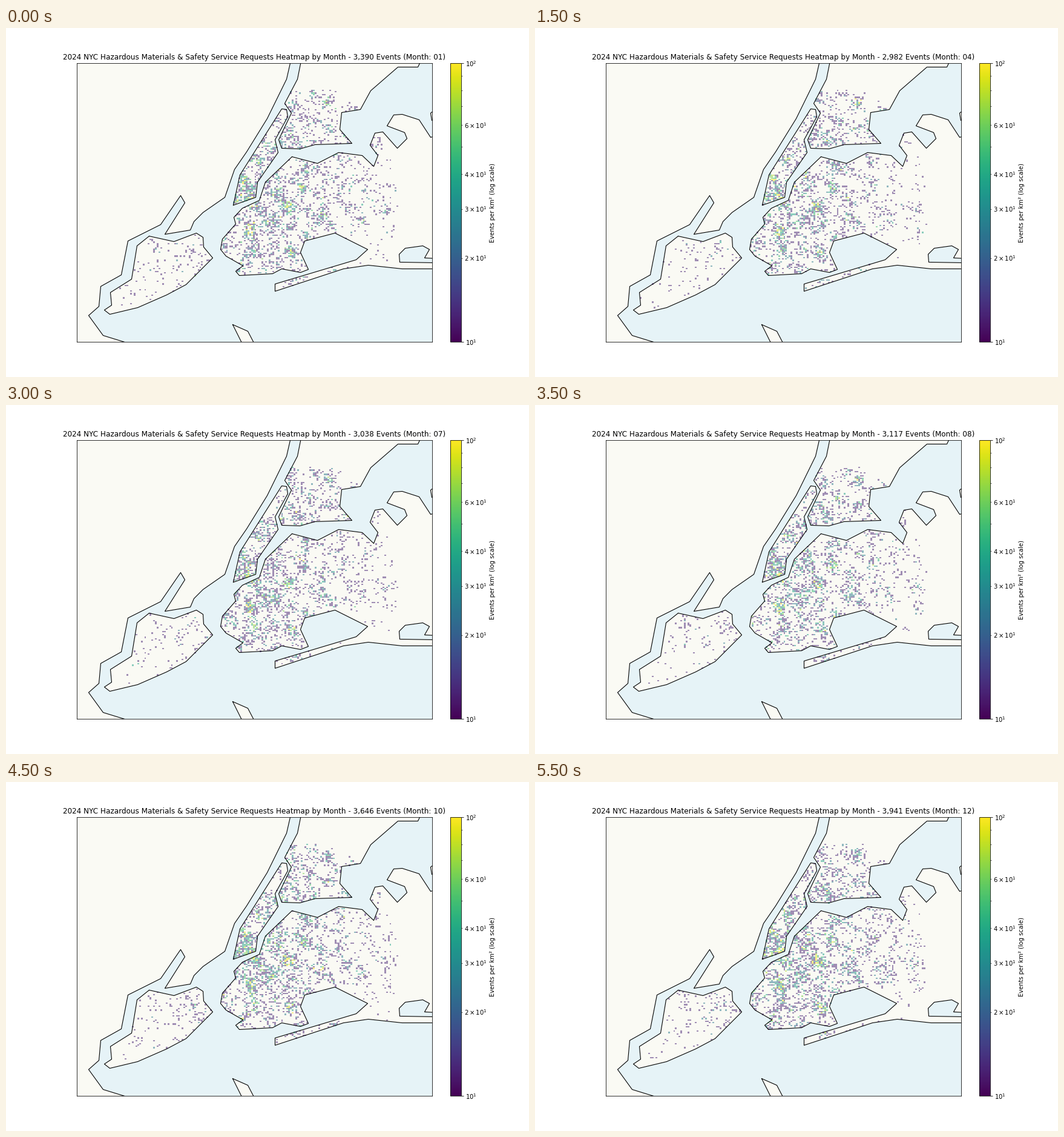
A matplotlib script for the animation above (6 s loop, 864 px wide and 576 px high).

```python
import numpy as np
import matplotlib.pyplot as plt
from matplotlib.animation import FuncAnimation
from matplotlib.cm import ScalarMappable
from matplotlib.colors import LogNorm
from matplotlib.path import Path

W, H, DPI = 864, 576, 72
LEFT, RIGHT, TOP, BOTTOM = 117, 704, 58, 518
BINS = 200
PER_KM2 = 12.6  # density of a cell holding one event
LAND, WATER = "#fafaf4", "#e6f3f7"
EVENTS = [3390, 2871, 3018, 2982, 3104, 3062, 3038, 3117, 3154, 3646, 10911, 3941]
SURGE_MONTH = 10

# Corner points of the coast, in stage pixels with y pointing down
WEST_SHORE = [
    (472, 50), (464, 85), (432, 150), (398, 205), (378, 234), (362, 280), (326, 305),
    (311, 320), (305, 334), (263, 341), (296, 289), (289, 277), (256, 325), (202, 352),
    (191, 408), (157, 427), (154, 460), (137, 475), (161, 508), (200, 520), (100, 530),
    (100, 50)]
STATEN = [
    (237, 344), (278, 353), (315, 339), (326, 346), (327, 362), (342, 380), (298, 424),
    (266, 441), (218, 462), (172, 473), (163, 466), (175, 458), (173, 437), (208, 415),
    (217, 360)]
MANHATTAN = [
    (376, 293), (413, 280), (416, 255), (450, 206), (445, 185), (466, 147), (464, 135),
    (456, 134), (387, 243)]
BRONX = [
    (489, 50), (482, 85), (461, 125), (472, 141), (451, 185), (456, 199), (486, 200),
    (511, 193), (572, 191), (552, 168), (555, 140), (586, 135), (603, 104), (648, 65),
    (681, 65), (688, 50)]
LONG_ISLAND = [
    (473, 213), (515, 224), (550, 206), (589, 211), (608, 229), (615, 211), (602, 194),
    (610, 174), (623, 172), (647, 199), (663, 183), (659, 173), (630, 162), (641, 144),
    (655, 143), (683, 152), (702, 181), (712, 178), (712, 398), (655, 398), (599, 392),
    (558, 398), (445, 435), (445, 423), (579, 383), (598, 366), (544, 339), (494, 352),
    (487, 371), (500, 399), (487, 404), (456, 398), (441, 406), (386, 409), (380, 402),
    (392, 393), (364, 377), (355, 366), (358, 349), (380, 324), (377, 313), (391, 298),
    (419, 285), (429, 255)]
SOUTH_SPIT = [(375, 490), (400, 501), (412, 524), (392, 524)]
EAST_POINT = [(712, 133), (702, 141), (704, 153), (712, 156)]
LAGOON = [(712, 381), (692, 380), (700, 366), (689, 360), (660, 364), (650, 374),
          (651, 387), (712, 388)]

# outline, usual weight, weight in the surge month
BOROUGHS = [(MANHATTAN, 1.8, 3.0), (BRONX, 2.0, 2.4), (LONG_ISLAND, 1.0, 4.0),
            (STATEN, 0.5, 2.2)]
CORE = 415, 298  # busiest point of the city
FADE, CITY_RADIUS, CITY_TOP = 85, 235, 102

# Outlines are given at pixel centres, half a pixel in from the axes box
x_edges = np.linspace(LEFT, RIGHT, BINS + 1) + 0.5
y_edges = np.linspace(TOP, BOTTOM, BINS + 1) + 0.5
gx, gy = np.meshgrid((x_edges[1:] + x_edges[:-1]) / 2, (y_edges[1:] + y_edges[:-1]) / 2)


def inside(outline):
    cells = np.column_stack([gx.ravel(), gy.ravel()])
    return Path(outline).contains_points(cells).reshape(gx.shape)


def neighbourhoods(waves=14, contrast=0.3):
    """Smooth patches of busy and quiet streets."""
    rng = np.random.default_rng(8)
    field = np.zeros_like(gx)
    for _ in range(waves):
        angle, phase = rng.uniform(0, 2 * np.pi, 2)
        turn = 2 * np.pi / rng.uniform(22, 60)
        field += np.cos(turn * (gx * np.cos(angle) + gy * np.sin(angle)) + phase)
    return np.exp(contrast * field)


distance = np.hypot(gx - CORE[0], gy - CORE[1])
in_city = (distance < CITY_RADIUS) & (gy > CITY_TOP) | inside(STATEN)
marsh = np.where((gx > 500) & (gy > 335), 0.35, 1)
base = np.exp(-distance / FADE) * in_city * marsh * neighbourhoods()
usual = base * sum(weight * inside(outline) for outline, weight, _ in BOROUGHS)
surge = base * sum(weight * inside(outline) for outline, _, weight in BOROUGHS)


def heat(month):
    rng = np.random.default_rng(100 + month)
    rate, shape = (surge, 2.0) if month == SURGE_MONTH else (usual, 1.0)
    mean = rate * EVENTS[month] / rate.sum()
    counts = rng.poisson(mean * rng.gamma(shape, 1 / shape, mean.shape))
    return np.ma.masked_equal(counts * PER_KM2, 0)


def pixel_axes(left, right):
    return fig.add_axes([left / W, 1 - BOTTOM / H, (right - left) / W, (BOTTOM - TOP) / H])


plt.rcParams["font.family"] = "DejaVu Sans"
fig = plt.figure(figsize=(W / DPI, H / DPI), dpi=DPI, facecolor="white")
ax = pixel_axes(LEFT, RIGHT)
ax.set(xlim=x_edges[[0, -1]], ylim=y_edges[[-1, 0]], xticks=[], yticks=[], facecolor=WATER)


def draw_shore(outline, fill=LAND):
    xs, ys = zip(*outline, outline[0])
    ax.fill(xs, ys, color=fill, lw=0, zorder=0)
    ax.plot(xs, ys, color="black", lw=1.1, zorder=2)


for shore in (WEST_SHORE, STATEN, MANHATTAN, BRONX, LONG_ISLAND, SOUTH_SPIT, EAST_POINT):
    draw_shore(shore)
draw_shore(LAGOON, WATER)

months = [heat(m) for m in range(12)]
norm = LogNorm(10, 100)
mesh = ax.pcolormesh(x_edges, y_edges, months[0], cmap="viridis", norm=norm, alpha=0.5,
                     zorder=1)
title = ax.set_title("", fontsize=12)
bar = fig.colorbar(ScalarMappable(norm, "viridis"), cax=pixel_axes(734, 752))
bar.set_label("Events per km² (log scale)")


def update(month):
    mesh.set_array(months[month])
    title.set_text("2024 NYC Hazardous Materials & Safety Service Requests Heatmap by Month"
                   f" - {EVENTS[month]:,} Events (Month: {month + 1:02d})")
    return mesh, title


anim = FuncAnimation(fig, update, frames=12, interval=500, repeat=True, repeat_delay=0)
plt.show()
```
